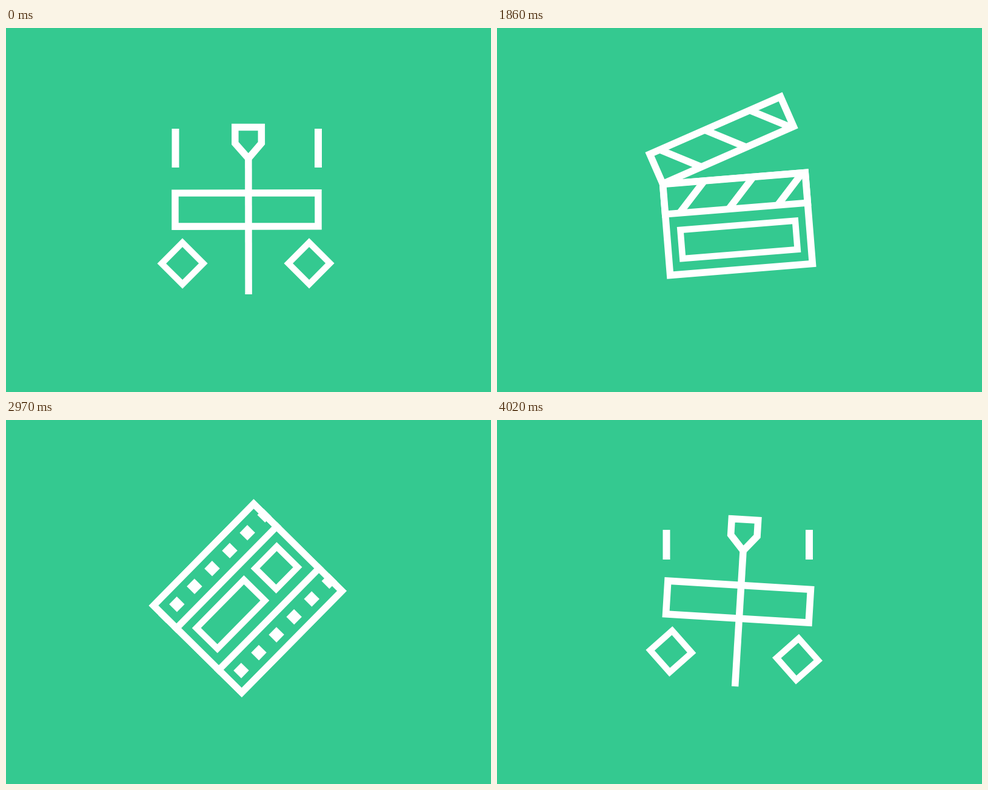
An HTML page with a canvas that plays this animation: 800x600 px, repeating every 4.05 s.

```html
<!DOCTYPE html>
<html lang="en">
<head>
<meta charset="utf-8">
<title>Film icons</title>
<style>
  html, body { margin: 0; width: 100%; height: 100%; overflow: hidden; background: #34c990; }
  canvas { display: block; }
</style>
</head>
<body>
<canvas id="stage" width="800" height="600"></canvas>
<script>
const ctx = document.getElementById('stage').getContext('2d');
const LOOP = 4050;
const TO_CLAPPER = 1042, TO_FILM = 2447, TO_STAND = 3811;
const LONG = 247, SHORT = 216, LINE = 11.5;

const clamp = p => Math.min(1, Math.max(0, p));
const mix = (a, b, p) => a + (b - a) * p;

// 0 to 1 with soft ends.
function ramp(t, from, to) {
  const p = clamp((t - from) / (to - from));
  return p * p * (3 - 2 * p);
}

// 0 to 1 slowing down.
const glide = (t, from, to) => 1 - (1 - clamp((t - from) / (to - from))) ** 2;

// Up to 1, hold, back to 0.
const pulse = (t, in1, in2, out1, out2) => ramp(t, in1, in2) - ramp(t, out1, out2);

// 0 to 1 with a slight overshoot; every icon swings in this way.
function land(t, start) {
  const q = 1 - ramp(t, start, start + 517), over = 1.25;
  return 1 - q * q * ((over + 1) * q - over);
}

function at(x, y, deg, draw, scale = 1) {
  if (scale <= 0) return;
  ctx.save();
  ctx.translate(x, y);
  ctx.rotate(deg * Math.PI / 180);
  ctx.scale(scale, scale);
  draw();
  ctx.restore();
}

// Hollow box, given by its outer edge.
function box(x, y, w, h, line = LINE) {
  if (w <= 0 || h <= 0) return;
  ctx.beginPath();
  ctx.rect(x, y, w, h);
  if (w > 2 * line && h > 2 * line) ctx.rect(x + line, y + line, w - 2 * line, h - 2 * line);
  ctx.fill('evenodd');
}

const centred = (x, y, w, h, line) => box(x - w / 2, y - h / 2, w, h, line);

function poly(points, closed) {
  ctx.beginPath();
  points.forEach(p => ctx.lineTo(...p));
  if (closed) ctx.closePath();
  ctx.stroke();
}

// Slanted line growing from its middle by k.
function stripe(cx, cy, dx, dy, k) {
  if (k > 0) poly([[cx - dx * k, cy - dy * k], [cx + dx * k, cy + dy * k]]);
}

function drawStand(t) {
  const leave = TO_CLAPPER + LOOP;
  const out = ramp(t, 4800, leave);
  const slim = pulse(t, TO_STAND, 4000, 4800, leave);
  const post = 64 * pulse(t, 3958, 4050, 4790, 4910);
  const diamond = pulse(t, TO_STAND, 3990, 4800, 4990);
  const rod = pulse(t, TO_STAND, 3990, 4840, 5070);
  const slide = 7.5 * ramp(t, 4200, 4770);

  for (const x of [273.5, 509]) ctx.fillRect(x, 230 - post, 12, post);
  at(395.5, 316.5, 45 * (1 - land(t, TO_STAND) + out), () => {
    centred(1.5 * slim - 21 * out, 3 * out - 17 * slim, LONG + 0.5, mix(SHORT, 66.5, slim));
    for (const x of [-104.5, 104.5]) at(x, 71.5, 45, () => centred(0, 0, 58.8, 58.8, 10.3), diamond);
    at(4.5 + slide, -16.5, 0, () => {
      poly([[0, -88], [0, 139]]);
      poly([[-22, -136.5], [21.5, -136.5], [21.5, -110], [0, -85], [-22, -110]], true);
    }, rod);
  });
}

function drawClapper(t) {
  const out = ramp(t, 2200, TO_FILM);
  const tilt = 5.4 * ramp(t, 1600, 1945);
  const open = 19.6 * pulse(t, 1500, 1900, 2180, 2300);
  const band = LONG * ramp(t, TO_CLAPPER, 1318);
  const middle = pulse(t, TO_CLAPPER, 1200, 2270, 2420);
  const sides = pulse(t, 1200, 1330, 2270, 2420);
  const stripes = (x, y, dx, dy) => {
    for (const i of [-1, 0, 1]) stripe(x + 81 * i, y, dx, dy, i ? sides : middle);
  };

  const turn = -45 * (1 - land(t, TO_CLAPPER)) - tilt + (45 + tilt) * out;
  at(mix(397, 385, out), mix(323, 307, out), turn, () => {
    centred(0, 0, LONG, 162);
    centred(0, -50.5, band, 61, 11);
    at(0, 26, 0, () => centred(0, 0, 200.6, 58, 10.5), ramp(t, TO_CLAPPER, 1140));
    stripes(9.5, -50.5, 22.5, -25);
    at(-118, -75.5, -open, () => {
      box(-5.5, -59.5, LONG, 65);
      stripes(125, -27, 26, 27);
    });
  });
}

function drawFilm(t) {
  const enter = ramp(t, TO_FILM, 2590);
  const drift = 1 - ramp(t, 2550, 2850);
  const out = ramp(t, 3500, TO_STAND);
  const lines = ramp(t, 3550, 3770);
  const split = mix(16, 123, glide(t, TO_FILM, 3560));
  const hole = 18 * pulse(t, 2620, 2780, 3450, 3620);
  const cap = 6.5 * pulse(t, 2480, 2590, 2630, 2720);
  const pitch = 41.4;

  const x = mix(398.7, 395.5, out) + 8.4 * drift;
  const y = mix(293.8, 316.5, out) - 5 * drift;
  at(x, y, -45 + 89.6 * land(t, TO_FILM), () => {
    ctx.translate(-SHORT / 2, -LONG / 2);
    ctx.beginPath();
    ctx.rect(0, 0, SHORT, LONG);
    ctx.clip();
    box(0, 0, SHORT, LONG);

    const left = mix(mix(106.5, 59, enter), 5.5, lines);
    const right = mix(157, 210.5, lines);
    for (const line of [left, right]) ctx.fillRect(line - 5.5, 0, 11, LONG);
    for (const end of [10, LONG - 11 - cap]) ctx.fillRect(8, end, 48, cap + 1);

    // Perforations run along with the frames.
    for (const [px, shift] of [[31.8, -87.4], [184, -84.2]]) {
      const first = ((split + shift) % pitch + pitch) % pitch;
      for (let i = -1; i < 7; i++) {
        ctx.fillRect(px - hole / 2, first + i * pitch - hole / 2, hole, hole);
      }
    }

    const top = Math.max(24, split + 8);
    at(mix(26, 77, enter) + 29.5, LONG / 2, 0, () => {
      ctx.translate(-29.5, -LONG / 2);
      box(0, 24, 59, split - 32, 10.5);
      box(0, top, 59, 223 - top, 10.5);
    }, 1 - ramp(t, 3480, 3680));
  });
}

function render() {
  const t = performance.now() % LOOP;
  ctx.fillStyle = '#34c990';
  ctx.fillRect(0, 0, 800, 600);
  ctx.fillStyle = ctx.strokeStyle = '#fff';
  ctx.lineWidth = LINE;
  if (t < TO_CLAPPER) drawStand(t + LOOP);
  else if (t < TO_FILM) drawClapper(t);
  else if (t < TO_STAND) drawFilm(t);
  else drawStand(t);
  requestAnimationFrame(render);
}
render();
</script>
</body>
</html>
```
